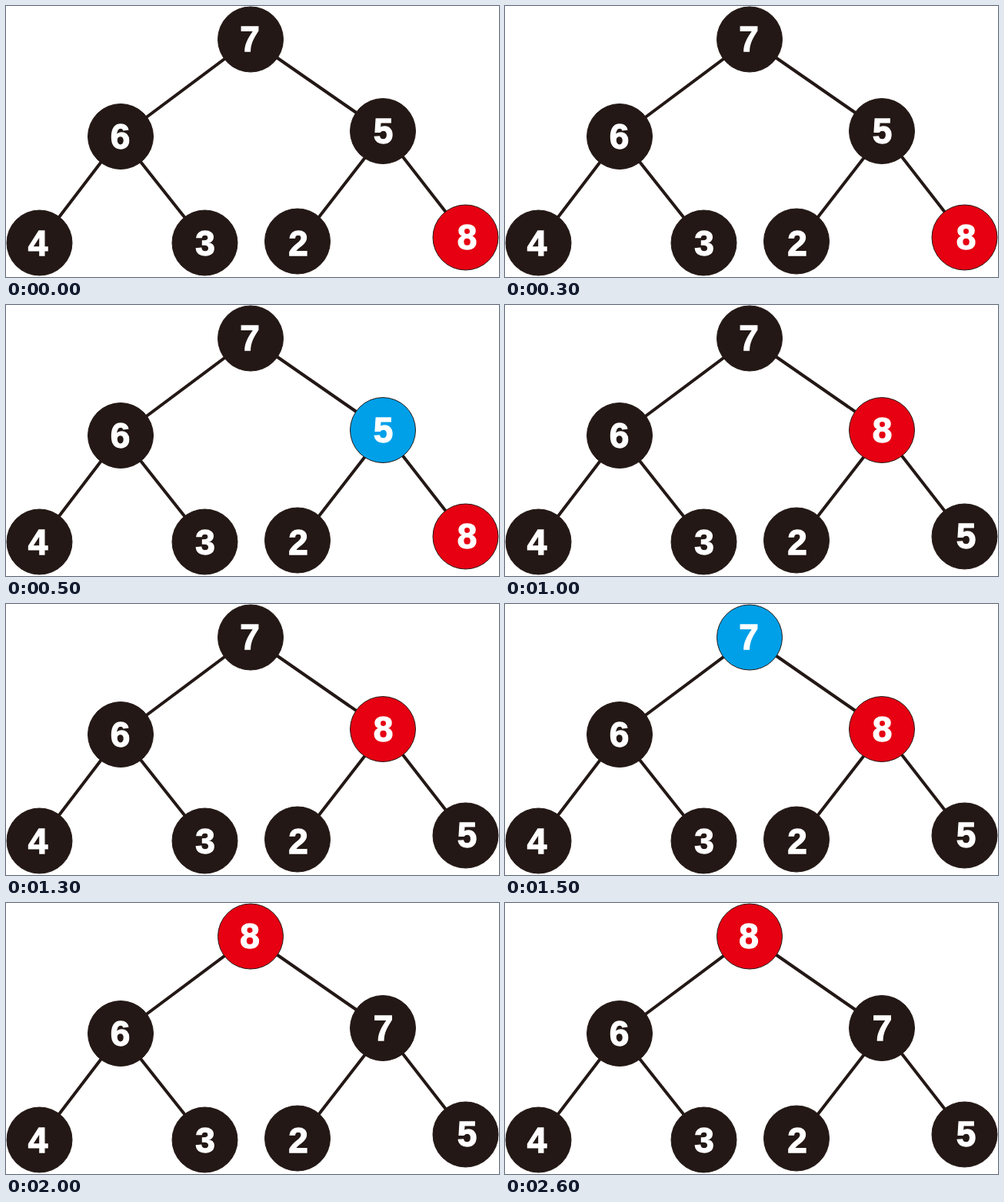
Animation, 641 px wide and 353 px high, one loop 3 s. Source, as an HTML page:

```html
<!DOCTYPE html>
<html lang="en">
<head>
<meta charset="utf-8">
<title>Heap sift-up</title>
<style>
  html, body { margin: 0; width: 100%; height: 100%; overflow: hidden; background: #fff; }
  svg { display: block; width: 641px; height: 353px; }
  line { stroke: #231815; stroke-width: 4; }
  circle { stroke: #231815; stroke-width: 1; }
  text {
    font: bold 46px "Liberation Sans", Arial, sans-serif;
    fill: #fff; stroke: #fff; stroke-width: 1.3; text-anchor: middle;
  }
</style>
</head>
<body>
<svg id="tree" viewBox="0 0 641 353"></svg>
<script>
const DARK = '#231815', RED = '#e60012', BLUE = '#00a0e9';
const STEP = 500, LOOP = 3000, RADIUS = 42.5, BASELINE = 15.5;

// Disc centre, label offset (dx, dy) and sideways edge offset
const nodes = [
  { x: 318, y: 43.5, dx: -1 },
  { x: 149, y: 170, dx: -0.5 },
  { x: 490, y: 163, dx: 0.5 },
  { x: 43.5, y: 308.5, dx: -2, dy: 1 },
  { x: 258.5, y: 308.5, dx: 0.5, dy: 1 },
  { x: 379, y: 306.5, dx: 1, dy: 3, edge: 3.5 },
  { x: 597.5, y: 301.5, dx: 2 }
];

const tree = document.getElementById('tree');
const parent = i => (i - 1) >> 1;

function add(tag, attrs) {
  const el = document.createElementNS('http://www.w3.org/2000/svg', tag);
  for (const key in attrs) el.setAttribute(key, attrs[key]);
  return tree.appendChild(el);
}

// Sift the last value up: mark the parent, swap, repeat
function siftUp(values) {
  const steps = [];
  let i = values.length - 1;
  const record = marks => steps.push({ values: [...values], marks });
  record({ [i]: RED });
  while (i > 0 && values[i] > values[parent(i)]) {
    const p = parent(i);
    record({ [i]: RED, [p]: BLUE });
    [values[i], values[p]] = [values[p], values[i]];
    i = p;
    record({ [i]: RED });
  }
  return steps;
}

nodes.slice(1).forEach(({ x, y, edge = 0 }, i) => {
  const top = nodes[parent(i + 1)];
  add('line', { x1: top.x + edge, y1: top.y, x2: x + edge, y2: y });
});

const parts = nodes.map(({ x, y, dx, dy = 0 }) => ({
  disc: add('circle', { cx: x, cy: y, r: RADIUS }),
  label: add('text', { x: x + dx, y: y + BASELINE + dy })
}));

const steps = siftUp([7, 6, 5, 4, 3, 2, 8]);
const start = performance.now();
let shown;

function show(step) {
  if (step === shown) return;
  shown = step;
  parts.forEach(({ disc, label }, i) => {
    disc.setAttribute('fill', step.marks[i] || DARK);
    label.textContent = step.values[i];
  });
}

function tick() {
  const t = (performance.now() - start) % LOOP;
  show(steps[Math.min(Math.floor(t / STEP), steps.length - 1)]);
  requestAnimationFrame(tick);
}

tick();
</script>
</body>
</html>
```
